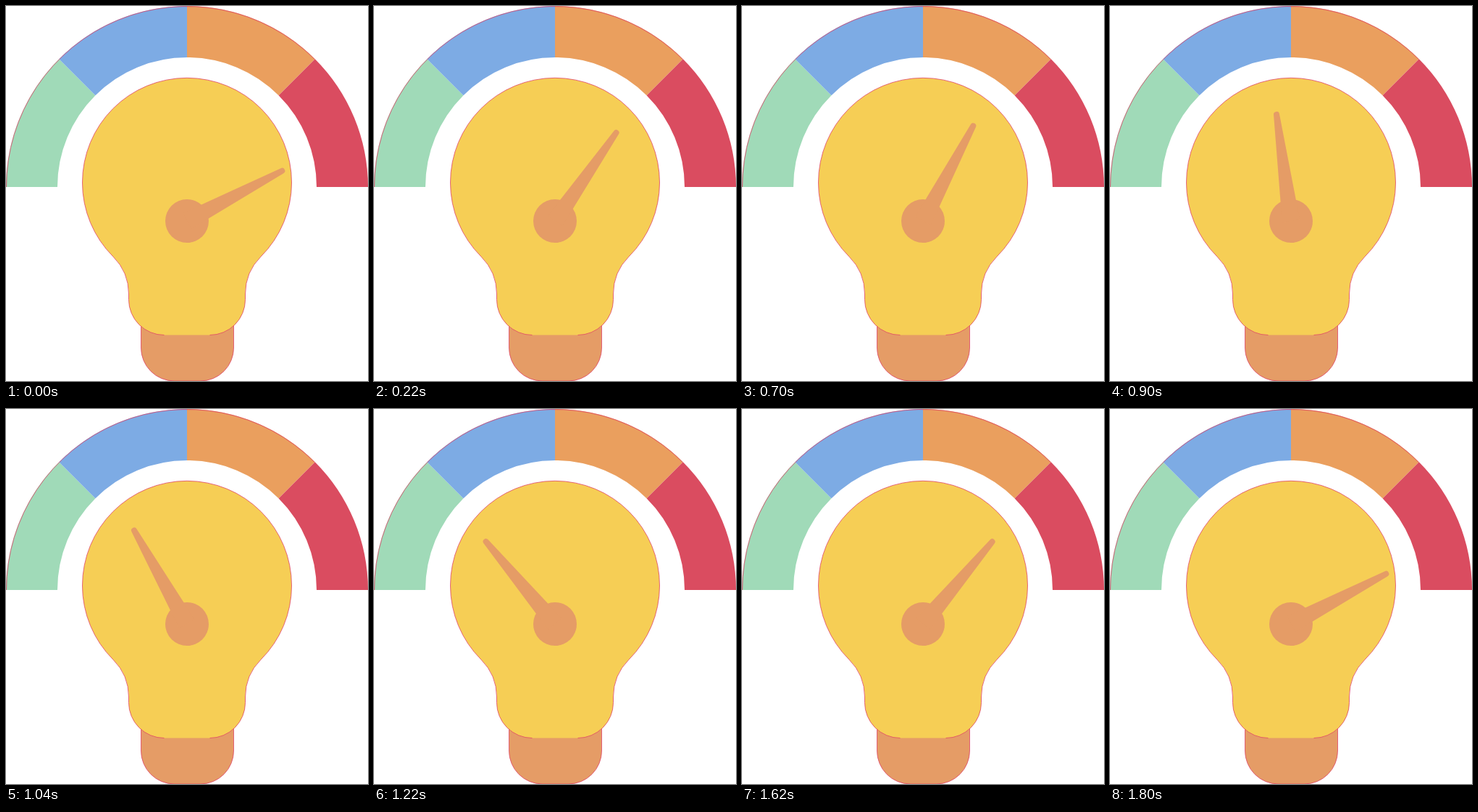
An HTML page that plays this animation: 500 by 518 pixels, repeating every 1820 ms.

```html
<!DOCTYPE html>
<html lang="en">
<head>
<meta charset="utf-8">
<title>Light bulb gauge</title>
<style>
  html, body { margin: 0; width: 100%; height: 100%; overflow: hidden; background: #fff; }
  svg { display: block; width: 100%; height: 100%; }
</style>
</head>
<body>
<svg viewBox="0 0 500 518">
  <g id="dial" fill="none" stroke-width="71"></g>
  <g stroke="#de4468" stroke-width=".8">
    <path fill="none" d="M.5 250A249.5 249.5 0 0 1 426.4 73.6"/>
    <path fill="#e59c66" d="M186.5 430V472A46 46 0 0 0 232.5 518H268.5A46 46 0 0 0 314.5 472V430"/>
    <path fill="#f6ce55" d="M218.5 454.5A49 49 0 0 1 169.5 405.5V398A73 73 0 0 0 148 346.2
      A144.5 144.5 0 1 1 352 346.2A73 73 0 0 0 330.5 398V405.5A49 49 0 0 1 281.5 454.5"/>
  </g>
  <g fill="#e59c66">
    <circle cx="250" cy="297" r="30"/>
    <path id="needle" d="M-12.3 0L-4 -148.5A4 4 0 0 1 4 -148.5L12.3 0Z"/>
  </g>
</svg>
<script>
const LOOP = 1820, STEP = 20;
// Needle swing: [time in ms, degrees from upright]
const keys = [[0, 62.2], [340, 23.7], [460, 50.2], [1200, -40.3], [1800, 62.2], [LOOP, 62.2]];
const needle = document.getElementById('needle');

// Four 45° segments from left to right
const point = a => `${250 - 214.5 * Math.cos(a)} ${250 - 214.5 * Math.sin(a)}`;
document.getElementById('dial').innerHTML = ['#a0dab8', '#7dabe4', '#ea9f5e', '#da4c60']
  .map((color, i) => {
    const a = i * Math.PI / 4;
    return `<path stroke="${color}" d="M${point(a)}A214.5 214.5 0 0 1 ${point(a + Math.PI / 4)}"/>`;
  }).join('');

const smooth = x => x * x * (3 - 2 * x);

function angleAt(t) {
  const i = keys.findIndex(key => key[0] > t);
  const [t0, a0] = keys[i - 1], [t1, a1] = keys[i];
  return a0 + (a1 - a0) * smooth((t - t0) / (t1 - t0));
}

const start = performance.now();
function draw() {
  const t = (performance.now() - start) % LOOP;
  needle.setAttribute('transform', `translate(250 297) rotate(${angleAt(t - t % STEP)})`);
  requestAnimationFrame(draw);
}
draw();
</script>
</body>
</html>
```
